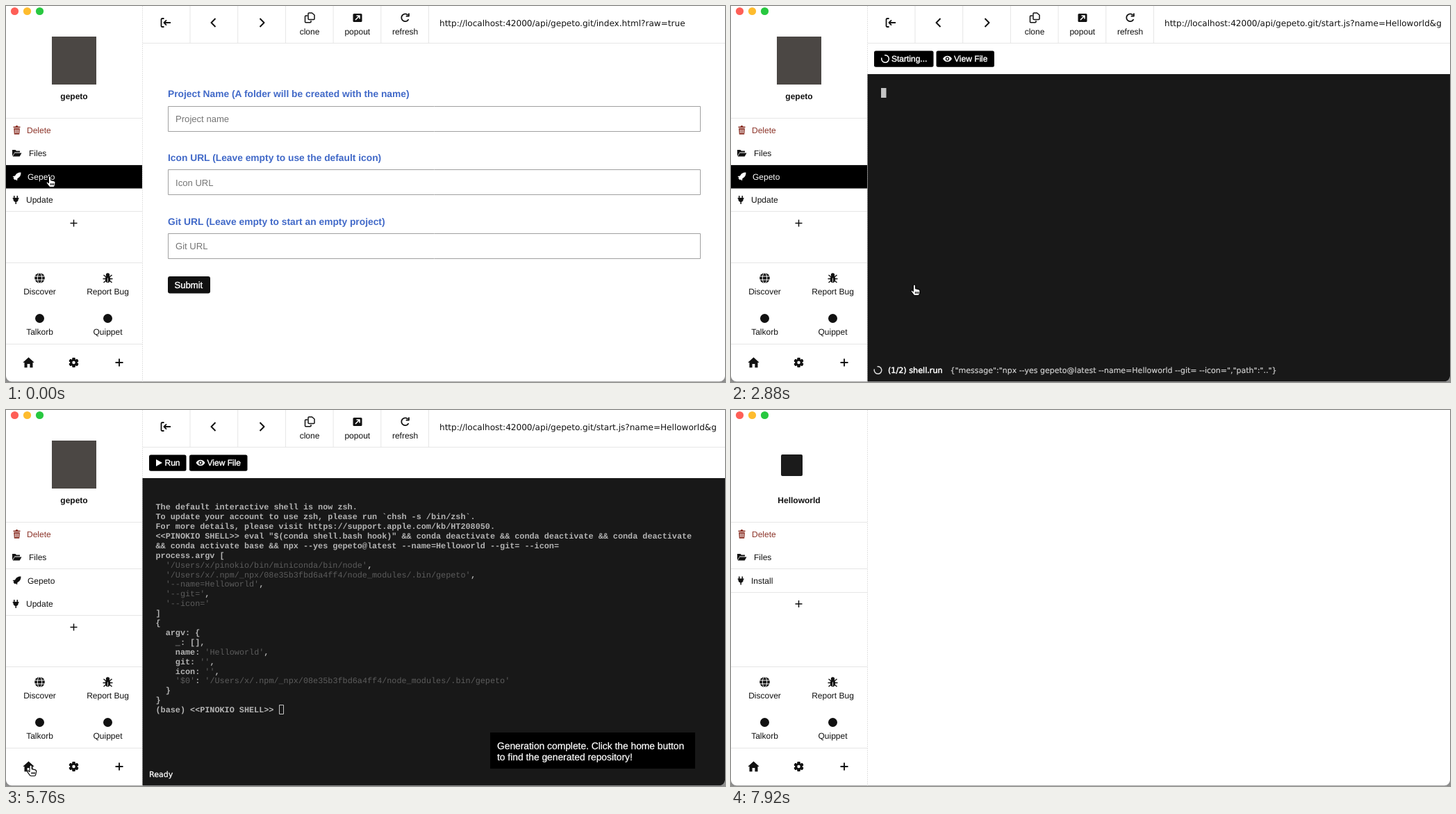
Write an HTML page with a canvas that moves like this. It is 1035 px wide and 541 px high and loops after 8 s.

```html
<!DOCTYPE html>
<html lang="en">
<head>
<meta charset="utf-8">
<title>Project generator</title>
<style>
html, body { margin: 0; width: 100%; height: 100%; overflow: hidden; background: #fff; }
canvas { display: block; width: 1035px; height: 541px; }
</style>
</head>
<body>
<canvas id="stage"></canvas>
<script>
const W = 1035, H = 541, LOOP = 8000, STEP = 120;
const SANS = '"Liberation Sans", Arial, sans-serif';
const WIDE = '"DejaVu Sans", Verdana, sans-serif';
const MONO = '"Liberation Mono", "Courier New", monospace';
const INK = '#111', RULE = '#e6e6e6';

const canvas = document.getElementById('stage');
const ratio = window.devicePixelRatio || 1;
canvas.width = W * ratio;
canvas.height = H * ratio;
const ctx = canvas.getContext('2d');
ctx.textRendering = 'geometricPrecision';
ctx.lineJoin = 'round';

// Icon outlines, centred on the origin
const FILLS = {
  home: 'M0-7.5L8.2 0H6V7.2H1.9V2H-1.9V7.2H-6V0H-8.2Z',
  trash: 'M-5-5h3l1-1.5h2l1 1.5h3v1.5h-10zM-4.3-2.8h8.6l-.6 9h-7.4zM-2.4-1v5.5h.9v-5.5zM-.4-1v5.5h.9v-5.5zM1.6-1v5.5h.9v-5.5z',
  open: 'M-6.5 4.5v-9h4.5l1.5 1.5h5v2h-7.5zM-5.8 5l2.8-5h10l-2.8 5z',
  rocket: 'M6-6c-5 0-7 2-8.5 5l-3.5.5 2 2-1 1 2.5 2.5 1-1 2 2 .5-3.5c3-1.5 5-3.5 5-8.5z',
  plug: 'M-3-6h1.5v3h3v-3h1.5v3h1.5v1.5h-.7c0 3-1.3 4.2-2.8 4.5v3h-1.5v-3c-1.7-.3-3.1-1.5-3.1-4.5h-.7v-1.5h1.3z',
  eye: 'M-6.5 0c3-5.6 10-5.6 13 0c-3 5.6-10 5.6-13 0zM2.7 0a2.7 2.7 0 1 0-5.4 0a2.7 2.7 0 1 0 5.4 0zM1.4 0a1.4 1.4 0 1 0-2.8 0a1.4 1.4 0 1 0 2.8 0z',
  play: 'M-4-5l9 5-9 5z',
  disc: 'M6.5 0a6.5 6.5 0 1 0-13 0a6.5 6.5 0 1 0 13 0z',
  bolt: 'M-7-23L13-26L6-14H12L4-2H9L-13 25L-7 6H-12L-8-6H-13Z',
  person: 'M-18 21c0-9 5-12 11-13c-8-20 4-25 9-22c9 1 9 13 7 22c5 1 9 5 9 13z'
};
const LINES = {
  plus: 'M-5 0H5M0-5V5',
  back: 'M3-6L-3 0L3 6',
  next: 'M-3-6L3 0L-3 6',
  exit: 'M-2.5-6H-5Q-6.5-6-6.5-4.5V4.5Q-6.5 6-5 6H-2.5M7 0H-2.5M1-3.6L-2.6 0L1 3.6',
  clone: 'M-1-7H3.5L7-4V1.5Q7 2.5 6 2.5H-1Q-2 2.5-2 1.5V-6Q-2-7-1-7ZM-3-3H-5.5Q-6.5-3-6.5-2V5.7Q-6.5 6.7-5.5 6.7H1Q2 6.7 2 5.7V4',
  refresh: 'M5 2.2A5.4 5.4 0 1 1 4-4M5.4-6.6V-2.4H1.2',
  folder: 'M-5.5 4.5v-9h4l1.5 1.5h5.5v7.5z',
  prompt: 'M-6-4.5L-1.5 0L-6 4.5M0 4.5H7',
  wifi: 'M-8.3-1.6Q0-9 8.3-1.6M-5.2 1.5Q0-3.2 5.2 1.5',
  laptop: 'M-6 3.5v-9h12v9M-8.5 5.5h17M-1.5-3L-3.5-1L-1.5 1M1.5-3L3.5-1L1.5 1',
  legs: 'M-7 1H7M-6-4.5L-3-2H3L6-4.5M-6 6.5L-3 4H3L6 6.5'
};
const HAND = 'M0 0c1 0 1.6.6 1.6 1.6v4l4.4 1c1.6.4 2.3 1.2 2 2.8l-.8 4.2c-.3 1.4-.8 1.9-2 1.9h-4.5c-1 0-1.5-.4-2.1-1.2l-3.4-4.6c-.8-1.2.6-2.3 1.7-1.4l1.5 1.3v-8c0-1 .6-1.6 1.6-1.6z';
const ARROW = 'M0 0V14L3.4 11L5.6 16L8 15L5.8 10H10Z';

function at(x, y, scale, draw) {
  ctx.save();
  ctx.translate(x, y);
  ctx.scale(scale, scale);
  draw();
  ctx.restore();
}
function fill(name, x, y, color = INK, scale = 1) {
  at(x, y, scale, () => {
    ctx.fillStyle = color;
    ctx.fill(new Path2D(FILLS[name]), 'evenodd');
  });
}
function line(name, x, y, width = 1.6, color = INK, scale = 1) {
  at(x, y, scale, () => {
    ctx.strokeStyle = color;
    ctx.lineWidth = width;
    ctx.stroke(new Path2D(LINES[name]));
  });
}
function box(x, y, w, h, color, r = 0) {
  ctx.fillStyle = color;
  ctx.beginPath();
  ctx.roundRect(x, y, w, h, r);
  ctx.fill();
}
function circle(x, y, r, color) {
  ctx.fillStyle = color;
  ctx.beginPath();
  ctx.arc(x, y, r, 0, 7);
  ctx.fill();
}
// y is the middle of the capitals; heavy thickens the strokes a little
function text(s, x, y, size, { color = INK, bold = false, font = SANS, align = 'left', heavy = 0 } = {}) {
  ctx.font = `${bold ? 'bold ' : ''}${size}px ${font}`;
  ctx.textAlign = align;
  ctx.fillStyle = ctx.strokeStyle = color;
  const base = y + size * 0.36;
  ctx.fillText(s, x, base);
  if (heavy) {
    ctx.lineWidth = heavy;
    ctx.strokeText(s, x, base);
  }
}
const hRule = (x, y, w, color = RULE) => box(x, y, w, 1, color);

function gear(x, y) {
  at(x, y, 1, () => {
    for (let i = 0; i < 6; i++) {
      box(-2, -7, 4, 14, INK, 1);
      ctx.rotate(Math.PI / 3);
    }
    circle(0, 0, 5.2, INK);
    circle(0, 0, 2.2, '#fff');
  });
}
function globe(x, y) {
  circle(x, y, 7.3, INK);
  ctx.strokeStyle = '#fff';
  ctx.lineWidth = 1;
  ctx.beginPath();
  ctx.ellipse(x, y, 3.2, 7.3, 0, 0, 7);
  ctx.moveTo(x - 7.3, y - 2.5); ctx.lineTo(x + 7.3, y - 2.5);
  ctx.moveTo(x - 7.3, y + 2.5); ctx.lineTo(x + 7.3, y + 2.5);
  ctx.stroke();
}
function bug(x, y) {
  line('legs', x, y, 1.4);
  ctx.fillStyle = INK;
  ctx.beginPath();
  ctx.ellipse(x, y + 1.5, 3.7, 5.3, 0, 0, 7);
  ctx.fill();
  circle(x, y - 4.5, 2.7, INK);
  box(x - 0.4, y, 0.8, 6, '#fff');
}
function wifi(x, y) {
  line('wifi', x, y, 1.8);
  circle(x, y + 4.5, 1.7, INK);
}
function spinner(x, y, t, color) {
  const a = t / 1000 * Math.PI * 2;
  ctx.strokeStyle = color;
  ctx.lineWidth = 1.5;
  ctx.beginPath();
  ctx.arc(x, y, 5.3, a - 1, a + 4.2);
  ctx.stroke();
}

const LINKS = {
  'Discover': globe,
  'Report Bug': bug,
  'Talkorb': (x, y) => fill('disc', x, y),
  'Quippet': (x, y) => fill('disc', x, y),
  'Files': (x, y) => fill('open', x, y, INK, 1.15),
  'WiFi': wifi,
  'Develop': (x, y) => line('laptop', x, y, 1.5),
  'Settings': gear
};
function link(name, x, y) {
  LINKS[name](x, y);
  text(name, x, y + 19.5, 12, { align: 'center' });
}

function lights() {
  ['#fe5f57', '#febc2e', '#28c840'].forEach((c, i) => circle(12.5 + 18 * i, 7.5, 5.6, c));
}

function menuRow(icon, label, x, y, color = INK) {
  if (icon === 'prompt') line(icon, 16.5, y + 0.5, 1.5, color);
  else fill(icon, icon === 'plug' ? 14 : 15.5, y, color);
  text(label, x, y, 12, { color });
}

function sidebar(t, made) {
  const picked = t < 3000, shell = t >= 3000 && t < 4560;
  ctx.strokeStyle = '#e2e2e2';
  ctx.lineWidth = 1;
  ctx.setLineDash([2, 1]);
  ctx.strokeRect(196.5, -1, 900, 600);
  ctx.setLineDash([]);

  if (made) box(72, 64, 31, 31, '#1b1b1b', 2);
  else box(66, 44, 64, 69, '#4b4744');
  text(made ? 'Helloworld' : 'gepeto', 98, 129.5, 12, { bold: true, align: 'center' });

  [161, 369, 486].forEach(y => hRule(0, y, 196));
  menuRow('trash', 'Delete', 30, 178.5, '#8c3429');
  menuRow('open', 'Files', 33, 211.5);
  hRule(0, 228, 196);
  if (made) {
    menuRow('plug', 'Install', 29, 245.5);
    hRule(0, 262, 196);
  } else {
    if (picked) box(0, 229, 196, 33.5, '#000');
    menuRow('rocket', 'Gepeto', 31, 245.5, picked ? '#fff' : INK);
    if (shell) {
      menuRow('prompt', 'Terminal', 34, 279);
      spinner(180, 279, t, INK);
    } else menuRow('plug', 'Update', 29, 279);
    hRule(0, 295, 196);
  }
  line('plus', 97.5, made ? 279 : 312.5, 1.5);

  link('Discover', 48.5, 391.5);
  link('Report Bug', 146.5, 391.5);
  link('Talkorb', 48.5, 449.5);
  link('Quippet', 146.5, 449.5);
  fill('home', 32.5, 513);
  gear(97.5, 513);
  line('plus', 163, 513, 1.7, INK, 1.1);
}

function toolbar(url) {
  hRule(197, 53, W - 197);
  for (let i = 0; i < 6; i++) box(264.5 + 68.7 * i, 0, 1, 53, RULE);
  line('exit', 230, 24, 1.8);
  line('back', 298.5, 24, 2);
  line('next', 368.5, 24, 2);
  line('clone', 437, 17, 1.5);
  box(499.5, 11, 13, 12, INK, 1.5);
  ctx.strokeStyle = '#fff';
  ctx.lineWidth = 1.6;
  ctx.stroke(new Path2D('M503 20L508.5 14.5M504.5 14H509V18.5'));
  line('refresh', 574.5, 17, 1.8);
  ['clone', 'popout', 'refresh'].forEach((s, i) => text(s, 437 + 68.8 * i, 36.5, 12, { align: 'center' }));
  text(url, 624, 24.5, 12.07, { font: WIDE });
}

function form(t) {
  const focus = t >= 720;
  const typed = t < 960 ? 0 : t < 1200 ? 1 : Math.min(10, Math.round(2 + (t - 1200) / 90));
  const value = 'Helloworld'.slice(0, typed);
  const fields = [
    ['Project Name (A folder will be created with the name)', 'Project name'],
    ['Icon URL (Leave empty to use the default icon)', 'Icon URL'],
    ['Git URL (Leave empty to start an empty project)', 'Git URL']
  ];
  fields.forEach(([label, hint], i) => {
    const y = 126.5 + 91.8 * i, active = focus && i === 0;
    text(label, 233, y, 13.8, { color: '#4169c8', bold: true });
    ctx.strokeStyle = active ? '#dc9a22' : '#a0a0a0';
    ctx.lineWidth = active ? 2 : 1;
    ctx.beginPath();
    ctx.roundRect(233.5, Math.round(y + 18) - 0.5, 766, 36, active ? 2 : 0);
    ctx.stroke();
    const filled = i === 0 && value;
    text(filled ? value : hint, 244, y + 35.5, 13.1, { color: filled ? INK : '#757575' });
    if (active && (t < 2000 || t % 1000 < 500)) {
      const x = 244 + (filled ? ctx.measureText(value).width : 0);
      box(x, y + 28, 1, 15, INK);
    }
  });
  box(233, 389, 61, 24.5, INK, 3);
  text('Submit', 242.5, 401, 13.1, { color: '#fff', heavy: 0.4 });
}

const BIN = "'/Users/x/.npm/_npx/08e35b3fbd6a4ff4/node_modules/.bin/gepeto'";
const OUTPUT = [
  'The default interactive shell is now zsh.',
  'To update your account to use zsh, please run `chsh -s /bin/zsh`.',
  'For more details, please visit https://support.apple.com/kb/HT208050.',
  '<<PINOKIO SHELL>> eval "$(conda shell.bash hook)" && conda deactivate && conda deactivate && conda deactivate',
  '&& conda activate base && npx --yes gepeto@latest --name=Helloworld --git= --icon=',
  'process.argv [',
  "  '/Users/x/pinokio/bin/miniconda/bin/node',",
  `  ${BIN},`,
  "  '--name=Helloworld',",
  "  '--git=',",
  "  '--icon='",
  ']', '{', '  argv: {', '    _: [],',
  "    name: 'Helloworld',",
  "    git: '',",
  "    icon: '',",
  `    '$0': ${BIN}`,
  '  }', '}',
  '(base) <<PINOKIO SHELL>> '
];
const CELL = 7.085, ROW = 13.9;

function terminal(t) {
  box(196.5, 98, W - 196.5, H - 98, '#181818');
  const count = t < 3120 ? 0 : t < 3240 ? 3 : t < 3960 ? 5 : OUTPUT.length;
  OUTPUT.slice(0, count).forEach((row, i) => {
    // quoted values are dim, except in the shell commands
    const parts = i < 5 ? [row] : row.split(/('[^']*')/);
    let col = 0;
    for (const part of parts) {
      const dim = i >= 5 && part[0] === "'";
      text(part, 215.5 + col * CELL, 139 + ROW * i, CELL / 0.6,
        { font: MONO, bold: !dim, color: dim ? '#5c5c5c' : '#b4b4b4' });
      col += part.length;
    }
  });
  const last = count ? OUTPUT[count - 1].length : 0;
  const x = 216 + last * CELL, y = 118 + ROW * count;
  if (t < 4440) box(x, y, 7.5, 14, '#c4c4c4');
  else {
    ctx.strokeStyle = '#c4c4c4';
    ctx.lineWidth = 1;
    ctx.strokeRect(Math.round(x) + 0.5, Math.round(y) + 0.5, 6, 13);
  }

  const done = t >= 4080, shift = done ? 0 : 31.5;
  const white = { color: '#fff', heavy: 0.4 };
  box(206, 64.5, done ? 53.5 : 85.5, 23.3, '#000', 2.5);
  if (done) {
    fill('play', 220, 76, '#fff');
    text('Run', 228.5, 76, 12, white);
  } else {
    spinner(222, 76, t, '#fff');
    text('Starting...', 231, 76, 12, white);
  }
  box(264 + shift, 64.5, 83.5, 23.3, '#000', 2.5);
  fill('eye', 280 + shift, 76, '#fff');
  text('View File', 289.5 + shift, 76, 12, white);

  if (done) text('Ready', 206, 524, 11, { color: '#fff', font: WIDE, heavy: 0.3 });
  else {
    spinner(211.5, 524, t, '#ddd');
    text('(1/2) shell.run', 226, 524, 11.2, { color: '#fff', font: WIDE, heavy: 0.5 });
    text('{"message":"npx --yes gepeto@latest --name=Helloworld --git= --icon=","path":".."}',
      315.5, 524, 11, { color: '#d0d0d0', font: WIDE, heavy: 0.2 });
  }
  if (t >= 4440) {
    box(697, 464, 295, 52, '#000');
    text('Generation complete. Click the home button', 707, 483, 13.8, { color: '#fff', heavy: 0.25 });
    text('to find the generated repository!', 707, 499.5, 13.8, { color: '#fff', heavy: 0.25 });
  }
}

function home(t) {
  fill('home', 29.5, 60.5, INK, 1.25);
  text('Filter downloaded apps', 68.5, 60.5, 13.1, { color: '#757575' });
  if ((t - 5880) % 1080 < 540) box(69, 53, 1, 15, INK);
  const links = { 'Discover': 552, 'Files': 607, 'WiFi': 651, 'Report Bug': 712.5, 'Talkorb': 782, 'Quippet': 839, 'Develop': 897.5, 'Settings': 960 };
  for (const name in links) link(name, links[name], 53.5);
  line('plus', 1009, 60.5, 1.6, INK, 1.4);
  text('NOT RUNNING', 10, 112, 13.8, { bold: true });

  ['Helloworld', 'InstantStyle-SDXL-Lightning', 'Llama3', 'cosxl', 'devika.git'].forEach((app, i) => {
    const y = i < 4 ? 164.5 + 89.5 * i : 515;
    line('folder', 89.5, y, 1, '#555');
    text('/api/' + app, 98, y, 12.07, { font: WIDE, color: '#444' });
    text(app.replace('.git', '').toUpperCase(), 83.5, y + 17.5, 15.7, { bold: true });
    if (i < 4) hRule(0, 218.5 + 89.5 * i, W, '#dedede');
  });
  box(22, 161, 27, 27, '#1b1b1b', 2);
  fill('bolt', 44, 264, '#fbb52d');
  circle(44, 353, 18, '#0866e0');
  circle(44, 442.5, 15, '#5068c8');
  fill('person', 42, 524, '#4a3a38');
}

// time, x, y of the pointer tip; it rests between equal points
const PATH = [
  [0, 63, 245], [120, 70, 240], [600, 248, 162], [1980, 248, 162], [2040, 250, 175],
  [2520, 264, 401], [4680, 264, 401], [5520, 35, 511], [5940, 36, 511],
  [6600, 172, 180], [7020, 172, 180], [7800, 40, -20]
];
function pointer(t) {
  if (t >= 7800 || (t >= 960 && t < 2040)) return;
  const i = PATH.findIndex(p => p[0] > t);
  const [t0, x0, y0] = PATH[i - 1], [t1, x1, y1] = PATH[i];
  const k = (t - t0) / (t1 - t0), e = k * k * (3 - 2 * k);
  const x = x0 + (x1 - x0) * e, y = y0 + (y1 - y0) * e;
  const onForm = t < 2760;
  const inField = onForm && x > 233 && [144, 236, 328].some(f => y > f && y < f + 36);
  const onLink = (x < 196 && y > 162 && y < 296 && t < 5880) || (onForm && x > 233 && y > 389) ||
    (t >= 2760 && t < 4800) || (t >= 5400 && t < 6960);
  at(x, y, 1, () => {
    if (inField) {
      ctx.strokeStyle = '#222';
      ctx.lineWidth = 1;
      ctx.stroke(new Path2D('M-2.5-7Q0-7 0-5V5Q0 7 2.5 7M2.5-7Q0-7 0-5M0 5Q0 7-2.5 7'));
      return;
    }
    const shape = new Path2D(onLink ? HAND : ARROW);
    ctx.fillStyle = onLink ? '#fff' : '#000';
    ctx.strokeStyle = onLink ? '#000' : '#fff';
    ctx.lineWidth = 1.1;
    ctx.fill(shape);
    ctx.stroke(shape);
    if (onLink) ctx.stroke(new Path2D('M1.5 10v3M3.5 10v3M5.5 10v3'));
  });
}

function draw(t) {
  ctx.setTransform(ratio, 0, 0, ratio, 0, 0);
  box(0, 0, W, H, '#8c8c8c');
  ctx.save();
  ctx.beginPath();
  ctx.roundRect(0, -20, W, 560.3, 8);
  ctx.clip();
  box(0, 0, W, H, '#fff');
  if (t >= 5880 && t < 6960) home(t);
  else {
    const made = t >= 6960;
    sidebar(t, made);
    if (!made) {
      const page = t < 2760 ? 'index.html?raw=true' : 'start.js?name=Helloworld&g';
      toolbar('http://localhost:42000/api/gepeto.git/' + page);
      if (t < 2760) form(t);
      else if (t >= 2880) terminal(t);
    }
  }
  lights();
  pointer(t);
  ctx.restore();
}

const start = performance.now();
function tick() {
  const t = (performance.now() - start) % LOOP;
  draw(Math.floor(t / STEP) * STEP);
  requestAnimationFrame(tick);
}
tick();
</script>
</body>
</html>
```
